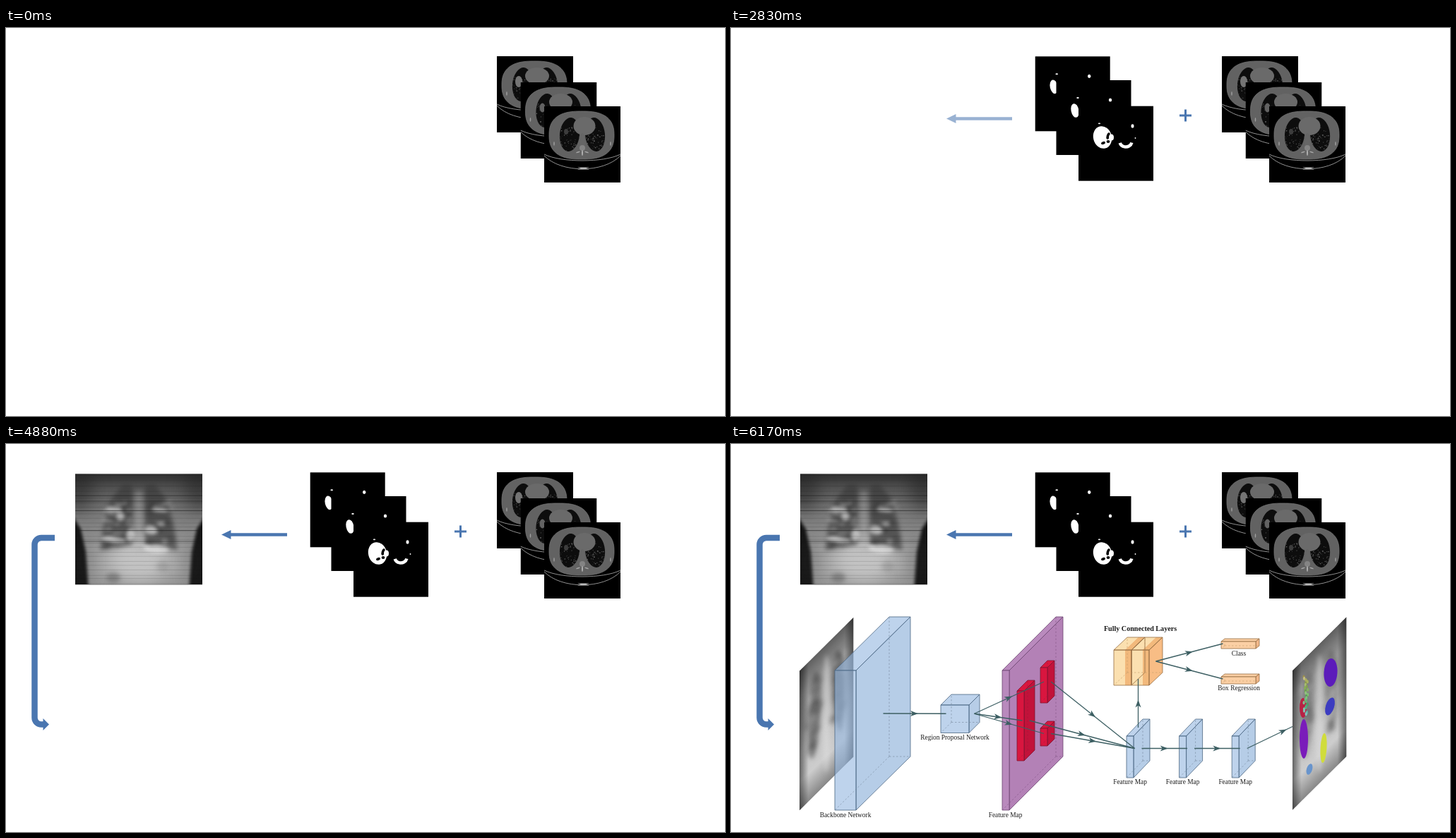
An HTML page with a canvas for the animation above (6210 ms loop, 1018 px wide and 550 px high).

```html
<!DOCTYPE html>
<html lang="en">
<head>
<meta charset="utf-8">
<title>From CT slices to detected regions</title>
<style>
html, body { margin: 0; width: 100%; height: 100%; overflow: hidden; background: #fff; }
canvas { display: block; }
</style>
</head>
<body>
<canvas id="stage" width="1018" height="550"></canvas>
<script>
const W = 1018, H = 550, LOOP = 6210, FPS = 24, FADE = 12;
const BLUE = '#4a76b0', TEAL = '#3d5f63';
const stage = document.getElementById('stage').getContext('2d');
let c; // context of the layer being drawn

function layer(draw) {
  const cv = document.createElement('canvas');
  cv.width = W;
  cv.height = H;
  c = cv.getContext('2d');
  draw();
  return cv;
}

function seeded(s) {
  return () => (s = (s * 16807) % 2147483647) / 2147483647;
}

const gray = (v, a = 1) => `rgba(${v},${v},${v},${a})`;
const spow = (v, p) => Math.sign(v) * Math.abs(v) ** p;

function poly(p, fill, line, width = 0.8) {
  c.beginPath();
  for (let i = 0; i < p.length; i += 2) c.lineTo(p[i], p[i + 1]);
  c.closePath();
  if (fill) { c.fillStyle = fill; c.fill(); }
  if (line) { c.strokeStyle = line; c.lineWidth = width; c.stroke(); }
}

function oval(x, y, rx, ry, fill, rot = 0) {
  c.beginPath();
  c.ellipse(x, y, rx, ry, rot, 0, 7);
  c.fillStyle = fill;
  c.fill();
}

function segment(x1, y1, x2, y2, color, width) {
  c.beginPath();
  c.moveTo(x1, y1);
  c.lineTo(x2, y2);
  c.strokeStyle = color;
  c.lineWidth = width;
  c.stroke();
}

function clipRect(x, y, w, h, fill) {
  c.beginPath();
  c.rect(x, y, w, h);
  c.clip();
  c.fillStyle = fill;
  c.fillRect(x, y, w, h);
}

function fade(x2, y2, ...tones) {
  const g = c.createLinearGradient(0, 0, x2, y2);
  tones.forEach((tone, i) => g.addColorStop(i / (tones.length - 1), tone));
  return g;
}

// ---- CT slices ----
function slice(x, y, heart, nodule, seed) {
  const rnd = seeded(seed), mid = 54, body = [];
  c.save();
  c.translate(x, y);
  clipRect(0, 0, 108, 108, '#000');
  for (let a = 0; a < 6.28; a += 0.05)
    body.push(53 + 46 * spow(Math.cos(a), 0.75), 41 + 34 * spow(Math.sin(a), 0.8));
  poly(body, '#626262', '#757575');

  for (const side of [-1, 1]) {
    oval(mid + side * 18, 40, 14, 24, '#0d0d0d', side * -0.1);
    c.save();
    c.clip();
    for (let i = 0; i < 70; i++) {
      const r = 0.3 + rnd() * 0.6;
      oval(mid + side * (4 + rnd() * 28), 30 + rnd() * 34, r, r, gray(60 + rnd() * 80 | 0, 0.8));
    }
    c.restore();
    oval(mid + side * 40, 53, 0.8, 3, '#a0a0a0');
    oval(mid + side * 6, 65, 3, 0.8, '#a8a8a8', side * 0.3);
  }
  oval(mid + 3, 28, ...heart, '#6a6a6a');
  oval(31, 36, ...nodule);
  oval(mid, 50, 4, 12, '#666');
  oval(mid, 59, 4, 4, '#848484');
  oval(mid, 66, 1, 4, '#b0b0b0');

  c.strokeStyle = '#b4b4b4';
  c.lineWidth = 0.8;
  for (const [top, sag] of [[68, 80], [70, 95]]) {
    c.beginPath();
    c.moveTo(0, top);
    c.bezierCurveTo(24, sag, 84, sag, 108, top);
    c.stroke();
  }
  poly([47, 86.5, 64, 86.5, 59, 88, 64, 89.5, 47, 89.5, 52, 88], '#bbb');
  c.restore();
}

const slices = layer(() => {
  slice(695, 40, [17, 12], [5, 8, '#747474'], 11);
  slice(728.5, 77, [16.5, 12], [4, 6.5, '#626262'], 29);
  slice(762, 111, [15.5, 13], [3, 4, '#3c3c3c'], 47);
});

const plus = layer(() => {
  segment(635, 124, 652, 124, BLUE, 3);
  segment(643.5, 115.5, 643.5, 132.5, BLUE, 3);
});

// ---- Masks ----
const masks = layer(() => {
  const card = (x, y) => { c.fillStyle = '#000'; c.fillRect(x, y, 106, 106); };
  for (const [x, y] of [[430.7, 40.3], [460.5, 74]]) {
    card(x, y);
    oval(x + 26.5, y + 43, 5.5, 10, '#fff', -0.2);
    oval(x + 30.5, y + 25, 1.8, 1, '#fff');
    oval(x + 76.5, y + 28, 2.2, 2.6, '#fff');
  }
  card(492, 110.7);
  oval(526, 155, 13, 16, '#fff', -0.25);
  oval(534, 153, 2.2, 5, '#000', 0.3);
  oval(527, 163, 3, 2, '#000', -0.4);
  oval(534, 161, 2.4, 2, '#000');
  oval(538.5, 155, 3.5, 4.5, '#fff');
  oval(521.5, 135.3, 1.7, 0.9, '#fff');
  oval(568.5, 139, 2, 2.8, '#fff');
  oval(572.5, 156, 0.9, 0.9, '#fff');
  c.beginPath();
  c.ellipse(559, 161, 8.5, 7.5, 0, 0.2, 2.9);
  c.strokeStyle = '#fff';
  c.lineWidth = 4.5;
  c.stroke();
});

const leftArrow = layer(() => {
  segment(398, 128.5, 317, 128.5, BLUE, 4.5);
  poly([305, 128.5, 318.5, 122, 318.5, 135], BLUE);
});

// ---- Projected X-ray, symmetric about its middle ----
const xray = layer(() => {
  const rnd = seeded(73), mid = 90;
  c.translate(98, 42.5);
  clipRect(0, 0, 180, 157, '#141414');
  const both = draw => [-1, 1].forEach(draw);

  c.filter = 'blur(2px)';
  const tone = fade(0, 157, gray(48), gray(92), gray(118), gray(135), gray(160), gray(165), gray(150));
  poly([-9, -9, 189, -9, 189, 52, 172, 78, 165, 110, 161, 166, 19, 166, 15, 110, 8, 78, -9, 52], tone);
  c.filter = 'blur(12px)';
  oval(mid, 122, 42, 34, gray(220, 0.55));
  both(s => oval(mid + s * 88, 20, 24, 34, gray(30, 0.5)));
  both(s => oval(mid + s * 78, 125, 8, 40, gray(50, 0.45)));

  c.filter = 'blur(3px)';
  both(s => poly([9, 16, 22, 14, 38, 34, 49, 70, 55, 108, 34, 105, 9, 100].map((v, i) => i % 2 ? v : mid + s * v),
    gray(58, 0.68)));
  c.fillStyle = gray(175, 0.35);
  c.fillRect(mid - 5, 25, 10, 85);

  // Cloudy streaks, denser near the base
  c.filter = 'blur(2.5px)';
  for (let i = 0; i < 50; i++) {
    const s = i % 2 ? 1 : -1, y = 42 + rnd() * 64;
    oval(mid + s * (10 + rnd() * 36), y, 4 + rnd() * 7, 1.5 + rnd() * 2.5,
      gray(rnd() > 0.4 ? 210 : 40, 0.25), (rnd() - 0.5) * 0.8);
  }
  for (const [x, y, rx, ry] of [[55, 50, 12, 4], [64, 60, 6, 6], [54, 93, 18, 4], [78, 87, 6, 9],
    [120, 51, 12, 3], [107, 80, 9, 6], [115, 106, 17, 6]])
    oval(x, y, rx, ry, gray(235, 0.62), 0.1);
  c.filter = 'blur(3px)';
  oval(54, 147, 10, 7, gray(90, 0.5));
  oval(124, 131, 9, 8, gray(120, 0.3));

  c.filter = 'none';
  for (let y = 2; y < 157; y += 4 + rnd() * 4) segment(0, y, 180, y, gray(20, 0.14), 0.9);
  for (const y of [31, 38.5, 52, 80, 95.5]) segment(0, y, 180, y, gray(20, 0.45), 1);
});

const bentArrow = layer(() => {
  c.beginPath();
  c.moveTo(69, 133);
  c.arcTo(40.5, 133, 40.5, 143, 9.5);
  c.arcTo(40.5, 397.5, 50, 397.5, 9.5);
  c.lineTo(53, 397.5);
  c.strokeStyle = BLUE;
  c.lineWidth = 8.5;
  c.stroke();
  poly([52.5, 389, 61, 397.5, 52.5, 406], BLUE);
});

// ---- Network diagram ----
const PALETTE = { // front, side, edge, hidden edge
  blue: ['rgba(150,185,225,.62)', 'rgba(138,174,216,.62)', '#4b6581', '#76899d'],
  purple: ['#b98abd', '#b381b6', '#6b4570', '#805485'],
  red: ['#d9163f', '#c2123a', '#7d1530', '#a31a3c'],
  cream: ['#fbe0b0', '#f2b97c'],
  amber: ['#f2b97c', '#f8bd85'],
  peach: ['#fbcfa4', '#f3b98b', '#956d42', '#c39a68'],
  frame: [null, null, '#956d42', '#c39a68']
};

// Draws a slanted block and returns the centres of its faces as ports
function box(x, y, w, h, d, name, rise = d) {
  const [front, side, line, hidden] = PALETTE[name];
  const r = x + w, b = y + h, bx = x + d, by = b - rise;
  poly([x, y, bx, y - rise, r + d, y - rise, r, y], front, line);
  poly([r, y, r + d, y - rise, r + d, by, r, b], side, line);
  poly([x, y, r, y, r, b, x, b], front, line);
  if (hidden) {
    c.setLineDash([2.5, 2.5]);
    for (const [px, py] of [[x, b], [bx, y - rise], [r + d, by]]) segment(bx, by, px, py, hidden, 0.6);
    c.setLineDash([]);
  }
  const mx = x + w / 2 + d / 2, my = y + h / 2 - rise / 2;
  return { west: [mx - w / 2, my], east: [mx + w / 2, my], north: [mx, my - h / 2], south: [mx, my + h / 2] };
}

// Line with an arrowhead at its middle
function link([x1, y1], [x2, y2]) {
  segment(x1, y1, x2, y2, TEAL, 1.3);
  c.save();
  c.translate((x1 + x2) / 2, (y1 + y2) / 2);
  c.rotate(Math.atan2(y2 - y1, x2 - x1));
  poly([5, 0, -6, -4, -3, 0, -6, 4], TEAL);
  c.restore();
}

function label(s, x, y, font = '9.4px') {
  c.font = font + ' "Liberation Serif", "Times New Roman", serif';
  c.textAlign = 'center';
  c.fillStyle = '#1c1c1c';
  c.fillText(s, x, y);
}

// Slanted picture: a 100 x 100 space sheared onto the diagram
function film(x, y, seed, dim) {
  const rnd = seeded(seed);
  c.save();
  c.transform(0.765, -0.76, 0, 1.98, x, y);
  clipRect(0, 0, 100, 100, fade(0, 100, gray(95), gray(150), gray(165), gray(195), gray(205), gray(135)));
  c.filter = 'blur(3px)';
  for (const side of [-1, 1]) oval(50 + side * 23, 42, 11, 30, gray(50, dim), side * -0.12);
  oval(50, 50, 7, 42, gray(225, 0.55));
  for (let i = 0; i < 30; i++)
    oval(50 + (i % 2 ? 23 : -23) + (rnd() - 0.5) * 24, 18 + rnd() * 54, 3 + rnd() * 6, 1 + rnd() * 3,
      gray(rnd() > 0.4 ? 200 : 60, 0.3));
  c.filter = 'none';
  c.fillStyle = fade(100, 0, gray(0, 0.5), gray(0, 0), gray(0, 0), gray(0, 0), gray(0, 0), gray(0, 0), gray(0, 0.5));
  c.fillRect(0, 0, 100, 100);
  c.restore();
}

function regions() {
  const rnd = seeded(61);
  oval(849, 324, 9.5, 20, '#5c1cba', 0.06);
  oval(848, 372, 6, 13, '#3c3cc0', 0.3);
  oval(811, 418, 6, 28, '#7a1cba');
  oval(839, 431, 4.5, 21, '#d0dc3c', 0.06);
  oval(810, 374, 5, 14, '#b82244');
  oval(819, 461, 4, 8, '#6894cc', 0.3);
  for (let i = 0; i < 24; i++) {
    const k = i / 24;
    oval(814 + rnd() * 6 - 3, 330 + k * 55, 1.6, 2.6, `hsl(${50 + k * 130},35%,${45 + rnd() * 20}%)`);
  }
}

const network = layer(() => {
  film(97, 321.5, 19, 0.5);
  const backbone = box(147, 321, 30, 198, 77, 'blue', 76);
  const rpn = box(297, 370, 40, 39.5, 15, 'blue');
  box(384, 321, 10, 198, 76, 'purple');
  const crops = [box(405, 350, 10, 99, 15, 'red'), box(438, 317, 10, 50, 10, 'red'), box(438, 403, 10, 25, 10, 'red')];
  const maps = [0, 1, 2].map(i => {
    label('Feature Map', 565 + i * 74.6, 482);
    return box(560 + i * 74.6, 414, 10, 59, 23, 'blue', 24);
  });
  for (const x of [542, 567]) {
    box(x, 292, 16, 50, 19, 'cream', 18);
    box(x + 16, 292, 9, 50, 19, 'amber', 18);
  }
  box(542, 292, 25, 50, 19, 'frame', 18);
  const dense = box(567, 292, 25, 50, 19, 'frame', 18);
  const heads = [280, 330].map(y => box(694, y, 49, 10, 5, 'peach', 4));

  link(backbone.east, rpn.west);
  for (const crop of crops) {
    link(rpn.east, crop.west);
    link(crop.east, maps[0].west);
  }
  link(maps[0].east, maps[1].west);
  link(maps[1].east, maps[2].west);
  link(maps[0].north, [576.5, 333]);
  for (const head of heads) link(dense.east, head.west);
  link(maps[2].east, [833.5, 382]);
  film(795, 321, 61, 0.3);
  regions();

  label('Backbone Network', 162, 529);
  label('Region Proposal Network', 317, 419);
  label('Feature Map', 388.5, 529);
  label('Class', 719, 300);
  label('Box Regression', 719, 349);
  label('Fully Connected Layers', 579.5, 265, 'bold 10.1px');
});

// Each layer fades in over half a second from its start, counted in 24 fps steps
const scene = [
  [slices, -FADE],
  [plus, 5.3],
  [masks, 35.3],
  [leftArrow, 61.3],
  [xray, 82.6],
  [bentArrow, 102.5],
  [network, 128.4]
];

function render(now) {
  const step = Math.floor((now % LOOP + 4) * FPS / 1000);
  stage.globalAlpha = 1;
  stage.fillStyle = '#fff';
  stage.fillRect(0, 0, W, H);
  for (const [img, start] of scene) {
    stage.globalAlpha = Math.min(1, Math.max(0, (step - start) / FADE));
    stage.drawImage(img, 0, 0);
  }
  requestAnimationFrame(render);
}

render(0);
</script>
</body>
</html>
```
